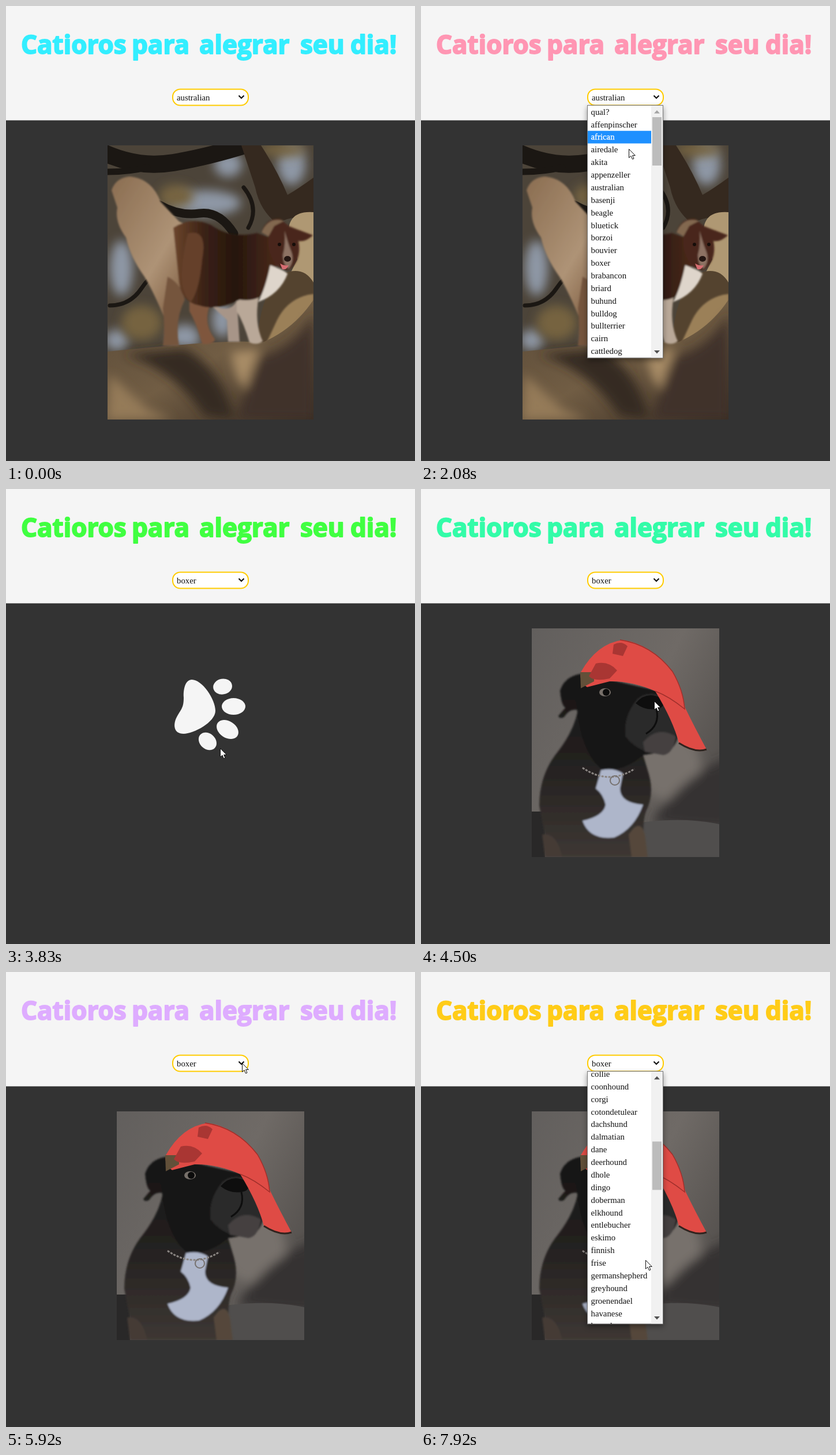
An HTML page that plays this animation: 709x790 px, repeating every 8 s.

```html
<!DOCTYPE html>
<html lang="pt">
<head>
<meta charset="utf-8">
<title>Catioros</title>
<style>
html, body { margin: 0; width: 100%; height: 100%; overflow: hidden; background: #333; }
svg { display: block; width: 709px; height: 790px; }
#title { font: 700 44px "Open Sans", "Noto Sans", sans-serif; stroke-width: 2; stroke-linejoin: round; }
.label { font: 14.8px "Liberation Serif", "Noto Serif", serif; fill: #111; }
.label .on { fill: #fff; stroke: #fff; stroke-width: .3; }
#menu { filter: drop-shadow(0 4px 5px rgba(0, 0, 0, .4)); }
</style>
</head>
<body>
<svg viewBox="0 0 709 790">
  <defs>
    <clipPath id="clipTree"><rect x="176" y="242" width="357" height="476"/></clipPath>
    <clipPath id="clipRoom"><rect x="192" y="242" width="325" height="397"/></clipPath>
    <clipPath id="clipList"><rect x="289" y="173" width="110" height="438"/></clipPath>
    <filter id="soft" x="-40%" y="-40%" width="180%" height="180%"><feGaussianBlur stdDeviation="9"/></filter>
    <filter id="fur" x="-20%" y="-20%" width="140%" height="140%"><feGaussianBlur stdDeviation="1.5"/></filter>
    <linearGradient id="bark" x1="0" y1="0" x2="1" y2="1">
      <stop offset="0" stop-color="#5b4b38"/><stop offset=".5" stop-color="#715d44"/><stop offset="1" stop-color="#382c22"/>
    </linearGradient>
    <linearGradient id="tail" x1="0" y1="0" x2="1" y2="1">
      <stop offset="0" stop-color="#8a6d51"/><stop offset=".55" stop-color="#ae9376"/><stop offset="1" stop-color="#6b472c"/>
    </linearGradient>
    <linearGradient id="coat" x1="0" y1="0" x2="1" y2="0">
      <stop offset="0" stop-color="#6c452c"/><stop offset=".3" stop-color="#3a2114"/><stop offset=".6" stop-color="#26160e"/><stop offset="1" stop-color="#4a291a"/>
    </linearGradient>
    <linearGradient id="wall" x1="0" y1="0" x2="1" y2=".6">
      <stop offset="0" stop-color="#625f5d"/><stop offset=".6" stop-color="#6f6a66"/><stop offset="1" stop-color="#55514e"/>
    </linearGradient>
    <linearGradient id="brindle" x1="0" y1="0" x2="0" y2="1">
      <stop offset="0" stop-color="#151414"/><stop offset=".5" stop-color="#242120"/><stop offset="1" stop-color="#3d3733"/>
    </linearGradient>
  </defs>

  <rect width="709" height="790" fill="#333"/>
  <rect width="709" height="198.5" fill="#f5f5f5"/>

  <g id="tree" clip-path="url(#clipTree)">
    <rect x="176" y="242" width="357" height="476" fill="#4c4439"/>
    <g fill="#8e97a5" filter="url(#soft)">
      <ellipse cx="200" cy="455" rx="20" ry="48"/><ellipse cx="345" cy="342" rx="62" ry="22"/>
      <ellipse cx="385" cy="275" rx="24" ry="22"/><ellipse cx="495" cy="275" rx="24" ry="36"/>
      <ellipse cx="310" cy="575" rx="26" ry="22"/><ellipse cx="192" cy="580" rx="20" ry="18"/>
      <ellipse cx="375" cy="545" rx="18" ry="30"/>
    </g>
    <g fill="#76633f" filter="url(#soft)">
      <ellipse cx="295" cy="330" rx="30" ry="20"/><ellipse cx="235" cy="550" rx="35" ry="30"/>
      <ellipse cx="480" cy="250" rx="40" ry="12"/>
    </g>
    <g fill="none" stroke="#1b1713" stroke-linecap="round">
      <path d="M170 255Q230 282 290 272T420 240" stroke-width="30"/>
      <path d="M176 288Q215 288 245 280" stroke-width="11"/>
      <path d="M265 345Q300 365 335 360T395 395" stroke-width="15"/>
      <path d="M420 385Q440 350 412 315M180 520Q215 520 235 490T270 470" stroke-width="7"/>
    </g>
    <path d="M408 242H442Q470 285 488 328Q510 315 533 298V368Q495 362 470 378Q440 355 432 315Z" fill="#35291f"/>
    <path d="M533 358Q495 355 490 385L505 440L485 480L533 492Z" fill="#af9873"/>
    <path d="M435 595Q438 500 480 465Q515 450 533 480V560Z" fill="#54432f"/>
    <path d="M470 545Q490 505 533 500V540L450 588Z" fill="#9b8059" filter="url(#fur)"/>
    <path d="M176 600Q255 592 330 586T445 584Q500 560 533 510V718H176Z" fill="url(#bark)"/>
    <g filter="url(#soft)">
      <path d="M390 600L440 595L415 665Q395 650 390 600Z" fill="#a88c66"/>
      <path d="M180 640L245 700L290 718H176Z" fill="#947a58"/>
      <path d="M205 605Q290 630 345 712L395 718Q375 630 310 595Z" fill="#352a20"/>
      <path d="M440 610Q500 595 533 535V718H400Z" fill="#40332a"/>
    </g>
    <g filter="url(#fur)">
      <path d="M183 320Q190 298 215 296Q253 300 268 340L300 374L335 390L310 450Q300 510 277 548Q258 500 240 470Q215 435 208 402Q188 375 193 350Z" fill="url(#tail)"/>
      <path d="M280 470Q302 480 310 510Q292 545 300 590H272Q276 560 272 525Z" fill="#75543c"/>
      <path d="M318 500L355 515Q340 550 362 578Q362 588 340 587Q330 550 318 530Z" fill="#7f573c"/>
      <path d="M345 510Q385 540 400 512L405 583H385L383 545Z" fill="#a79588"/>
      <path d="M400 505H438Q430 550 445 582Q435 590 422 584Q412 550 400 530Z" fill="#b9a898"/>
      <path d="M290 385Q320 365 355 380Q390 405 435 394L465 405Q478 455 455 490Q440 515 405 510Q365 530 335 520Q305 515 300 480Z" fill="url(#coat)"/>
      <path d="M315 395Q350 385 340 440Q335 495 320 514Q292 490 315 395Z" fill="#65402a"/>
      <path d="M458 450Q485 460 488 465Q475 500 437 514Q450 490 458 450Z" fill="#ded5cb"/>
      <path d="M443 393Q450 368 475 369L490 382Q510 390 532 398Q520 410 507 408Q513 440 492 457Q475 463 462 440Q452 420 455 400Z" fill="#4a281a"/>
      <path d="M443 393Q455 365 482 373L465 382L455 400Z" fill="#826850"/>
      <path d="M483 390Q485 415 480 432Q480 450 490 456Q501 442 494 425Q488 410 483 390Z" fill="#8d7263"/>
    </g>
    <ellipse cx="488" cy="439" rx="6" ry="5" fill="#241612"/>
    <path d="M475 447Q483 452 490 450Q486 459 479 457Z" fill="#d76d72"/>
    <circle cx="474" cy="414" r="3" fill="#160e0a"/><circle cx="499" cy="414" r="3" fill="#160e0a"/>
  </g>

  <g id="room" clip-path="url(#clipRoom)">
    <rect x="192" y="242" width="325" height="397" fill="url(#wall)"/>
    <g filter="url(#soft)">
      <ellipse cx="430" cy="480" rx="55" ry="60" fill="#77716c"/>
      <path d="M400 580Q450 500 535 465V590Z" fill="#343333"/>
    </g>
    <path d="M192 572Q300 590 390 578Q460 570 517 582V639H192Z" fill="#504e4d"/>
    <path d="M192 560H215V639H192Z" fill="#292828"/>
    <g filter="url(#fur)">
      <path d="M285 320Q250 322 241 350Q243 375 250 380L238 394Q240 400 248 396Q258 380 272 384Q265 420 238 455Q205 495 205 550L222 639H393Q380 590 390 560Q405 530 395 495L385 462Z" fill="url(#brindle)"/>
      <path d="M268 340Q290 328 335 333L410 350Q440 370 446 405Q450 440 430 455L385 462Q355 490 315 488Q270 455 268 340Z" fill="#181717"/>
      <path d="M375 365Q392 350 418 360Q445 395 443 425Q437 450 405 458Q375 455 355 430Q350 395 375 365Z" fill="#2c2a2a"/>
      <path d="M385 440Q410 410 442 430Q437 460 420 462L388 456Z" fill="#444140"/>
      <path d="M312 488Q335 483 350 494L345 520Q345 545 385 548Q370 590 335 605Q292 610 280 576Q317 568 320 548Q316 530 303 520Z" fill="#aeb6ca"/>
      <path d="M360 600Q380 570 388 600L393 639H365Z" fill="#54473b"/>
      <path d="M210 600Q235 595 245 639H215Z" fill="#443b36"/>
    </g>
    <path d="M280 484Q325 515 370 486" fill="none" stroke="#8a8582" stroke-width="3" stroke-dasharray="4 2"/>
    <circle cx="336" cy="506" r="8" fill="none" stroke="#777270" stroke-width="2"/>
    <ellipse cx="319" cy="353" rx="10" ry="7" fill="#77706a"/><circle cx="321" cy="353" r="6" fill="#0b0b0b"/>
    <path d="M372 372Q392 348 420 365Q424 380 408 382Q388 385 372 372Z" fill="#0e0e0e"/>
    <path d="M408 382Q415 410 390 425" fill="none" stroke="#0e0e0e" stroke-width="3"/>
    <path d="M277 318Q305 268 350 262Q400 270 436 317Q453 345 458 380Q475 415 495 452Q475 458 447 441Q437 402 406 351Q365 333 327 334L288 344Q274 335 277 318Z" fill="#df4b45"/>
    <path d="M276 318L300 318V334L277 346Z" fill="#625039"/>
    <path d="M334 270Q348 263 358 273L350 290L332 286ZM303 303Q325 298 340 315L327 329Q300 335 291 325Z" fill="#a93633"/>
    <path d="M345 262Q400 270 436 317Q455 350 457 382Q430 360 406 351" fill="none" stroke="#9f2f2b" stroke-width="1.5"/>
    <path d="M495 452Q475 459 447 441" fill="none" stroke="#30231e" stroke-width="3"/>
  </g>

  <g id="paw" fill="#f5f5f5">
    <path d="M322 331C340 331 363 365 363 385C363 405 325 425 308 425C290 425 289 408 297 394C305 381 308 378 308 362C307 345 312 331 322 331Z"/>
    <ellipse cx="375.500" cy="343" rx="16.500" ry="13.500" transform="rotate(-10 375.500 343)"/>
    <ellipse cx="394.500" cy="377.500" rx="20.500" ry="14.500"/>
    <ellipse cx="384" cy="417.500" rx="20.500" ry="14.500" transform="rotate(33 384 417.500)"/>
    <ellipse cx="349.500" cy="438" rx="17" ry="13.500" transform="rotate(42 349.500 438)"/>
  </g>

  <g id="title">
    <text x="26" y="83">Catioros</text><text x="218" y="83">para</text><text x="335" y="83">alegrar</text>
    <text x="510" y="83">seu</text><text x="597" y="83">dia!</text>
  </g>

  <rect x="289" y="144.500" width="131" height="28" rx="13" fill="#fff" stroke="#fc0" stroke-width="2"/>
  <text id="choice" class="label" x="296" y="164"></text>
  <path d="M403.500 155.500L408 160L412.500 155.500" fill="none" stroke="#111" stroke-width="2.200"/>

  <g id="menu">
    <rect x="288.500" y="172.500" width="131" height="438.500" fill="#fff" stroke="#767676"/>
    <rect x="399" y="173" width="20" height="437.500" fill="#f1f1f1"/>
    <rect id="thumb" x="401" y="193" width="16" height="84" fill="#bcbcbc"/>
    <path id="up" d="M404 186.500L409 181L414 186.500Z"/>
    <path d="M404 598L409 603.500L414 598Z" fill="#505050"/>
    <g clip-path="url(#clipList)">
      <g id="list" class="label"><rect id="bar" x="289" width="110" height="21.870" fill="#1e90ff"/></g>
    </g>
  </g>

  <path id="cursor" d="M.5 .5V15.500L4 12.300L6.500 18L9 17L6.600 11.500H11.300Z" fill="#fff" stroke="#111"/>
</svg>
<script>
const LOOP = 8000, FRAME = 1000 / 12, HUE_LOOP = 5000;
const ROW = 21.87, LIST_TOP = 173;
const BREEDS = ("qual? affenpinscher african airedale akita appenzeller australian basenji beagle bluetick " +
  "borzoi bouvier boxer brabancon briard buhund bulldog bullterrier cairn cattledog chihuahua chow clumber " +
  "cockapoo collie coonhound corgi cotondetulear dachshund dalmatian dane deerhound dhole dingo doberman " +
  "elkhound entlebucher eskimo finnish frise germanshepherd greyhound groenendael havanese hound").split(" ");

// Each track row: time, then values.
const HUES = [
  [0, 51, 238, 255], [80, 56, 235, 255], [1080, 255, 160, 255], [1300, 255, 153, 255],
  [1780, 255, 150, 245], [2080, 255, 150, 180], [2830, 255, 194, 32], [2920, 255, 204, 24],
  [3280, 250, 245, 20], [3830, 64, 255, 64], [4400, 51, 255, 150], [5000, 51, 238, 255]
];
const POINTER = [
  [240, 703, 782], [540, 560, 430], [830, 372, 176], [1000, 352, 162], [1750, 352, 162],
  [2170, 362, 270], [2580, 370, 402], [2750, 371, 450], [4330, 371, 450], [4580, 420, 330],
  [4920, 488, 158], [5250, 488, 158], [5580, 450, 161], [6080, 389, 157], [6830, 389, 157],
  [7000, 389, 380], [7080, 389, 430], [7330, 389, 500]
];
const SCROLL = [[7400, 0], [7920, 535]];
const OPEN = [[1420, 3250], [6580, LOOP]];
const PICKED = 3250, LOADED = 4500, SCROLL_START = 7400;

const $ = id => document.getElementById(id);
const show = (id, on) => $(id).setAttribute("visibility", on ? "visible" : "hidden");

function sample(track, t) {
  const next = track.findIndex(row => row[0] > t);
  if (next === 0) return track[0].slice(1);
  if (next < 0) return track[track.length - 1].slice(1);
  const a = track[next - 1], b = track[next];
  const k = (t - a[0]) / (b[0] - a[0]);
  return a.slice(1).map((v, i) => v + (b[i + 1] - v) * k);
}

const items = BREEDS.map((name, i) => {
  const el = document.createElementNS("http://www.w3.org/2000/svg", "text");
  el.setAttribute("x", 294.5);
  el.setAttribute("y", LIST_TOP + i * ROW + 15.7);
  el.textContent = name;
  return $("list").appendChild(el);
});

// The highlight trails the pointer by one step and stays on its row while scrolling.
function hoveredRow(t, selected) {
  const y = sample(POINTER, Math.min(t, SCROLL_START) - FRAME)[1];
  return y < LIST_TOP ? selected : Math.floor((y - LIST_TOP) / ROW);
}

function draw(t) {
  const rgb = `rgb(${sample(HUES, t % HUE_LOOP).map(Math.round)})`;
  $("title").setAttribute("fill", rgb);
  $("title").setAttribute("stroke", rgb);

  const selected = BREEDS.indexOf(t < PICKED ? "australian" : "boxer");
  $("choice").textContent = BREEDS[selected];
  show("tree", t < PICKED);
  show("paw", t >= PICKED && t < LOADED);
  show("room", t >= LOADED);
  $("paw").setAttribute("transform", `rotate(${(t - 3833) * 0.18} 354 391.5)`);

  const open = OPEN.some(([from, to]) => t >= from - 1 && t < to);
  show("menu", open);
  if (open) {
    const [scroll] = sample(SCROLL, t);
    const row = hoveredRow(t, selected);
    $("list").setAttribute("transform", `translate(0 ${-scroll})`);
    $("thumb").setAttribute("y", 193 + scroll * 102 / 535);
    $("up").setAttribute("fill", scroll > 0 ? "#505050" : "#a3a3a3");
    $("bar").setAttribute("y", LIST_TOP + row * ROW);
    items.forEach((el, i) => el.setAttribute("class", i === row ? "on" : ""));
  }

  const [x, y] = sample(POINTER, t).map(Math.round);
  show("cursor", t >= POINTER[0][0]);
  $("cursor").setAttribute("transform", `translate(${x} ${y})`);
}

const start = performance.now();
function tick() {
  const t = (performance.now() - start) % LOOP;
  draw(Math.floor((t + 4) / FRAME) * FRAME % LOOP);
  requestAnimationFrame(tick);
}
tick();
</script>
</body>
</html>
```
